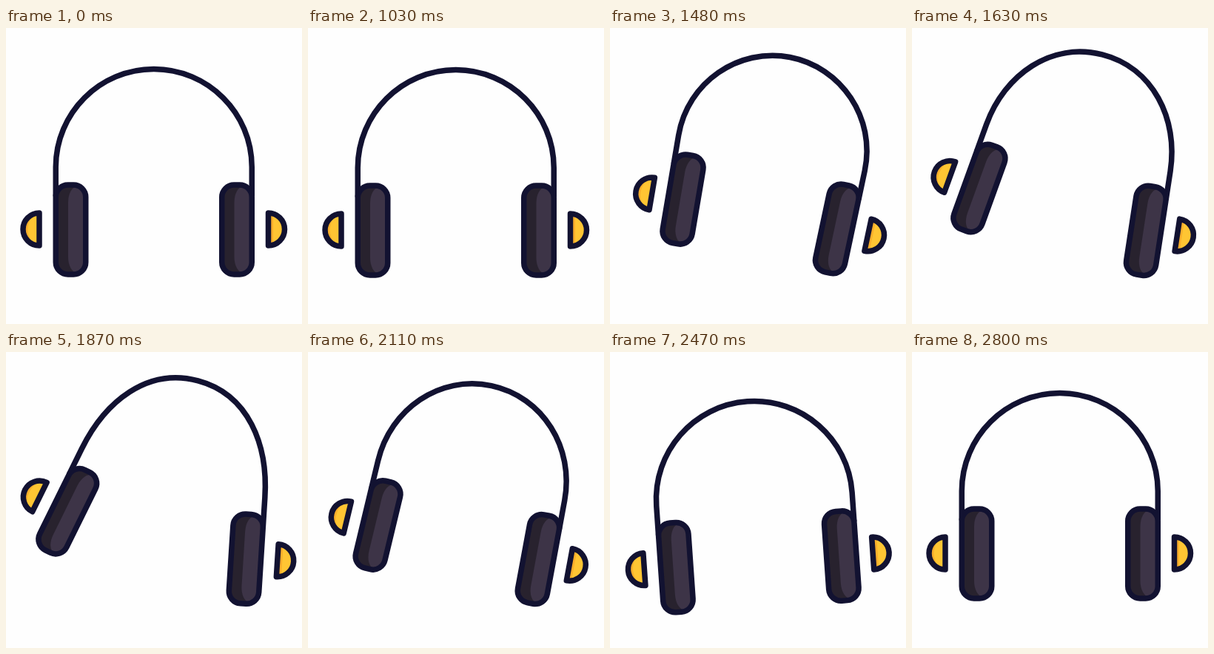
These frames come from a looping animation (400x400 px, 2.83 s). An HTML page with a canvas:

```html
<!DOCTYPE html>
<html lang="en">
<head>
<meta charset="utf-8">
<title>Headphones</title>
<style>
  html, body { margin: 0; width: 100%; height: 100%; overflow: hidden; background: #fefefe; }
  canvas { display: block; width: 100vw; height: 100vh; }
</style>
</head>
<body>
<canvas id="stage"></canvas>
<script>
const LOOP = 2830, START = 1030, STEP = 30, SIZE = 400;
const INK = '#121231', DARK = '#28222e', LIGHT = '#3d3447', GOLD = '#ffc533', AMBER = '#f9ae2b';
const LINE = 7.5, HINGE = 84.5, EDGE = 20.25, REST = 132.5;

// Dip, leap, swing out, hang, land and settle.
const poses = [
  { at: 1000, drop: 0, turn: 0, splay: 0 },
  { at: 1180, drop: 14, turn: 0, splay: 0 },
  { at: 1330, drop: -8, turn: 5.6, splay: -5 },
  { at: 1630, drop: -27.3, turn: 14.3, splay: 5.6 },
  { at: 1790, drop: -26.5, turn: 15.2, splay: 13 },
  { at: 2110, drop: -15.5, turn: 12, splay: 1.5 },
  { at: 2490, drop: 11, turn: -4.1, splay: 0 },
  { at: 2800, drop: 0, turn: 0, splay: 0 }
];

const canvas = document.getElementById('stage');
const ctx = canvas.getContext('2d');
const rad = deg => deg * Math.PI / 180;

function slope(key, i) {
  if (i === 0 || i === poses.length - 1) return 0;
  const rate = j => (poses[j + 1][key] - poses[j][key]) / (poses[j + 1].at - poses[j].at);
  const a = rate(i - 1), b = rate(i);
  return a * b <= 0 ? 0 : 2 * a * b / (a + b);
}

// Monotone cubic easing between poses: no overshoot.
function ease(key, t) {
  if (t <= poses[0].at) return poses[0][key];
  let i = poses.findIndex(p => p.at > t) - 1;
  if (i < 0) return poses[poses.length - 1][key];
  const a = poses[i], b = poses[i + 1];
  const h = b.at - a.at, u = (t - a.at) / h, s = u * u * (3 - 2 * u);
  return a[key] + (b[key] - a[key]) * s
    + h * u * (1 - u) * (slope(key, i) * (1 - u) - slope(key, i + 1) * u);
}

function shaded(shape, base, top, light) {
  ctx.save();
  ctx.clip(shape);
  ctx.fillStyle = base;
  ctx.fill(shape);
  ctx.fillStyle = top;
  ctx.fill(light);
  ctx.restore();
  ctx.stroke(shape);
}

const cup = new Path2D();
cup.roundRect(-EDGE, -60.5, 2 * EDGE, 121, 16.5);
const cupLight = new Path2D();
cupLight.ellipse(8, -37, 11.5, 21, 0, Math.PI, 2 * Math.PI);
cupLight.ellipse(8, 37, 11.5, 21, 0, 0, Math.PI);
cupLight.closePath();

function dome(side) {
  const shape = new Path2D();
  shape.arc(side * 42.5, -0.5, 22, -Math.PI / 2, Math.PI / 2, side < 0);
  shape.closePath();
  const light = new Path2D();
  if (side < 0) light.ellipse(-38, -0.5, 20, 24, 0, 0, 2 * Math.PI);
  else light.rect(49, -30, 30, 60);
  shaded(shape, AMBER, GOLD, light);
}

// The legs follow the cups; the arch joins them smoothly.
function band(w, d, s) {
  const top = -217 + (REST - w) * 0.25;
  const sin = Math.sin(s), cos = Math.cos(s);
  const at = (side, y) => [side * (d + EDGE * cos + y * sin), y * cos - EDGE * sin];
  const bend = 0.552 * (at(1, -HINGE)[1] - top), reach = 0.552 * w;
  ctx.beginPath();
  ctx.moveTo(...at(-1, -45));
  ctx.lineTo(...at(-1, -HINGE));
  ctx.bezierCurveTo(...at(-1, -HINGE - bend), -reach, top, 0, top);
  ctx.bezierCurveTo(reach, top, ...at(1, -HINGE - bend), ...at(1, -HINGE));
  ctx.lineTo(...at(1, -45));
  ctx.stroke();
}

function draw(t) {
  const drop = ease('drop', t), turn = ease('turn', t), splay = ease('splay', t);
  const s = rad(splay);
  const width = REST - 0.3 * Math.max(turn, 0) + Math.min(splay, 0);
  const d = width - EDGE * Math.cos(s) + HINGE * Math.sin(s);

  ctx.setTransform(canvas.width / SIZE, 0, 0, canvas.height / SIZE, 0, 0);
  ctx.fillStyle = '#fefefe';
  ctx.fillRect(0, 0, SIZE, SIZE);
  ctx.strokeStyle = INK;
  ctx.lineWidth = LINE;
  ctx.lineJoin = 'round';
  ctx.translate(199.75 + 0.27 * Math.abs(turn), 272.5 + drop);
  ctx.rotate(rad(turn));
  band(width, d, s);
  for (const side of [-1, 1]) {
    ctx.save();
    ctx.translate(side * d, 0);
    ctx.rotate(-side * s);
    shaded(cup, DARK, LIGHT, cupLight);
    dome(side);
    ctx.restore();
  }
}

function resize() {
  const ratio = window.devicePixelRatio || 1;
  canvas.width = Math.round(innerWidth * ratio);
  canvas.height = Math.round(innerHeight * ratio);
}

const begin = performance.now();
function tick() {
  const t = (performance.now() - begin) % LOOP;
  draw(t < START ? 0 : START + STEP * Math.floor((t - START) / STEP));
  requestAnimationFrame(tick);
}

addEventListener('resize', resize);
resize();
tick();
</script>
</body>
</html>
```
